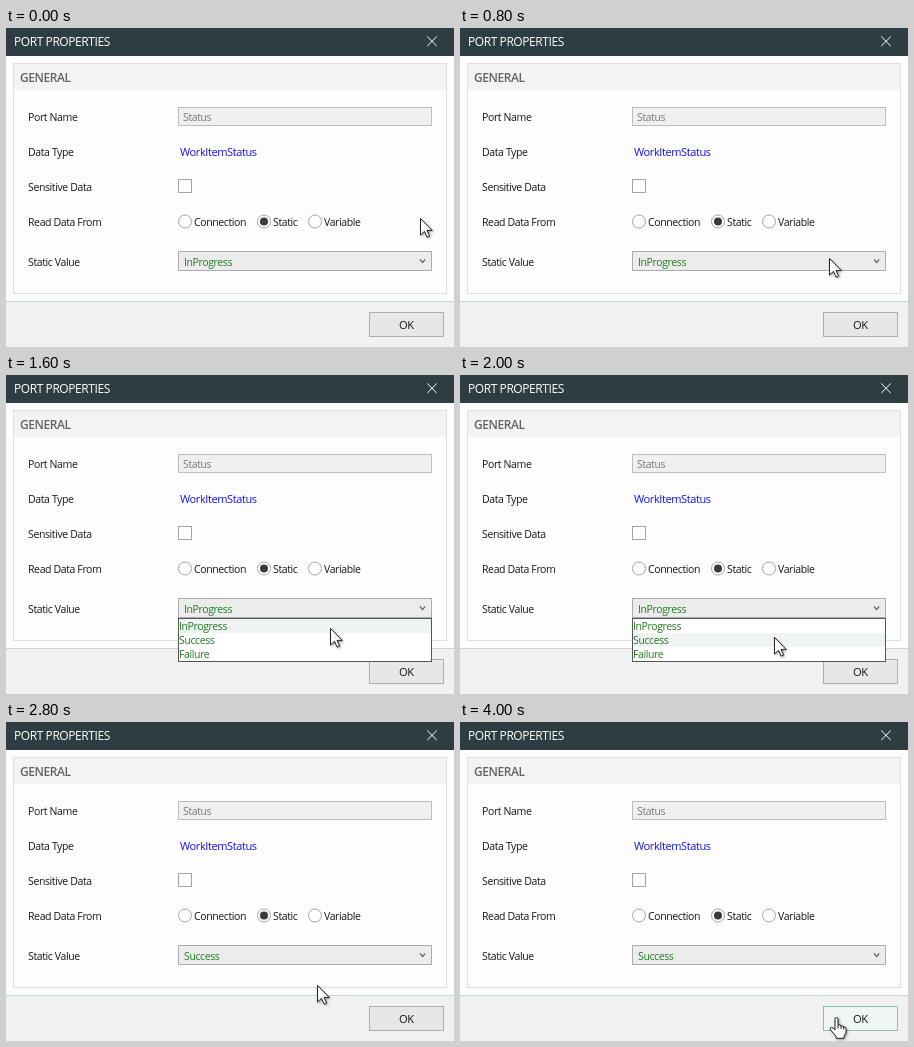
Recreate the animation shown at these times as an HTML page. Size 448 px wide and 319 px high, loop 4.2 s.

```html
<!DOCTYPE html>
<html lang="en">
<head>
<meta charset="utf-8">
<title>Port properties</title>
<style>
html, body { margin: 0; width: 100%; height: 100%; overflow: hidden; background: #fdfdfd; }
svg { display: block; width: 448px; height: 319px; }
text { font: 10.5px "Open Sans", "Noto Sans", sans-serif; letter-spacing: -.036em; fill: #161616; white-space: pre; }
.title { font-size: 12px; fill: #fff; }
.head { font-size: 12px; font-weight: 600; fill: #606466; }
.type { font-size: 11px; fill: #1010f0; }
.off { fill: #777; }
.ok { font-size: 11.2px; }
.value text, text.value { fill: #1f7a1f; }
.line { fill: #fff; stroke: #a4a4a4; }
#combo { fill: #ececec; stroke: #acacac; }
#combo.hot { fill: #e3effa; stroke: #7eb4de; }
#chevron { fill: none; stroke: #666; stroke-width: 1.2; }
.hot + #chevron { stroke: #111; }
#button { fill: #e7e7e7; stroke: #adadad; }
#button.hot { fill: #f1f5f4; stroke: #86c2b0; }
.cursor { fill: #fff; stroke: #222; stroke-linejoin: round; filter: drop-shadow(1.5px 1.5px 1px #0006); }
</style>
</head>
<body>
<svg viewBox="0 0 448 319">
  <rect width="448" height="319" fill="#fdfdfd"/>
  <rect width="448" height="28" fill="#2e3d41"/>
  <text class="title" x="8" y="18">PORT PROPERTIES</text>
  <path d="M421.2 8.500l9.600 9.600m0-9.600l-9.600 9.600" stroke="#fff"/>

  <rect x="7.5" y="35.5" width="433" height="230" fill="#fdfdfd" stroke="#dcdedf"/>
  <rect x="8" y="36" width="432" height="26" fill="#f3f3f3"/>
  <text class="head" x="14" y="54">GENERAL</text>

  <g id="labels"></g>
  <rect x="172.5" y="79.5" width="253" height="18" fill="#f0f0f0" stroke="#bdbdbd"/>
  <text class="off" x="177" y="93">Status</text>
  <text class="type" x="174" y="128">WorkItemStatus</text>
  <rect class="line" x="172.5" y="151.5" width="13" height="13"/>
  <g id="radios"></g>
  <circle cx="258" cy="193.5" r="4" fill="#3a3a3a"/>

  <rect id="combo" x="172.5" y="223.5" width="253" height="19"/>
  <path id="chevron" d="M414 231.500l2.600 3 2.600-3"/>
  <text id="picked" class="value" x="178" y="238"></text>

  <rect y="273" width="448" height="46" fill="#f1f1f1"/>
  <path d="M0 273.5h448" stroke="#c3d6d2"/>
  <rect id="button" x="363.5" y="284.5" width="74" height="24"/>
  <text class="ok" x="393" y="300.5">OK</text>

  <g id="list" class="value">
    <rect x="172.5" y="243.5" width="253" height="43" fill="#fff" stroke="#555"/>
    <rect id="row" x="173" width="252" height="14" fill="#f0f3f4"/>
    <text x="173" y="255">InProgress</text>
    <text x="173" y="269">Success</text>
    <text x="173" y="283">Failure</text>
  </g>

  <path id="arrow" class="cursor" d="M.5.5v16.5l4-3.7 2.6 5.8 2.5-1.1-2.6-5.6h5.2z"/>
  <path id="hand" class="cursor" transform="translate(369.5 295)"
    d="M5.5 13V2q0-1.5 1.5-1.5T8.5 2V8q3-.8 3 1 2.7-.6 2.7 1 2.3-.2 2.3 1.8v4l-2 3.5v2h-8v-2l-5.5-6.5q-1-2.5 1-2.5 1.2 0 3.5 2.7zM8.5 8v3.5M11.5 9v3M14.2 10v2.5"/>
</svg>
<script>
const $ = id => document.getElementById(id);
const LOOP = 4200;

// Pointer stops: time in ms, x, y
const stops = [
  [0, 414, 190], [400, 394, 207], [600, 369, 223], [800, 369, 230],
  [1400, 343, 242], [1600, 324, 253], [1800, 319, 257], [2000, 314, 262],
  [2200, 311, 263], [3400, 334, 279], [3600, 369, 293]
];

$("labels").innerHTML = [
  ["Port Name", 93], ["Data Type", 128], ["Sensitive Data", 163],
  ["Read Data From", 198], ["Static Value", 238]
].map(([label, y]) => `<text x="22" y="${y}">${label}</text>`).join("");

$("radios").innerHTML = [["Connection", 179], ["Static", 258], ["Variable", 309]]
  .map(([label, x]) => `<circle class="line" cx="${x}" cy="193.5" r="6.5"/>
    <text x="${x + 9}" y="198">${label}</text>`).join("");

const show = (id, on) => $(id).setAttribute("visibility", on ? "inherit" : "hidden");

function draw(t) {
  const during = (from, to) => t >= from && t < to;
  const [, x, y] = stops.findLast(stop => stop[0] <= t);
  const overButton = t >= 3800;

  $("arrow").setAttribute("transform", `translate(${x} ${y})`);
  show("arrow", !overButton);
  show("hand", overButton);
  $("button").classList.toggle("hot", overButton);

  $("combo").classList.toggle("hot", during(1000, 1600));
  show("list", during(1200, 2800));

  // The list row under the pointer is tinted
  const row = Math.floor((y - 244) / 14);
  $("row").setAttribute("y", 244 + 14 * row);
  show("row", during(1600, 2800));
  $("picked").textContent = t < 2800 ? "InProgress" : "Success";
}

const start = performance.now();
function tick() {
  draw((performance.now() - start) % LOOP);
  requestAnimationFrame(tick);
}
tick();
</script>
</body>
</html>
```
